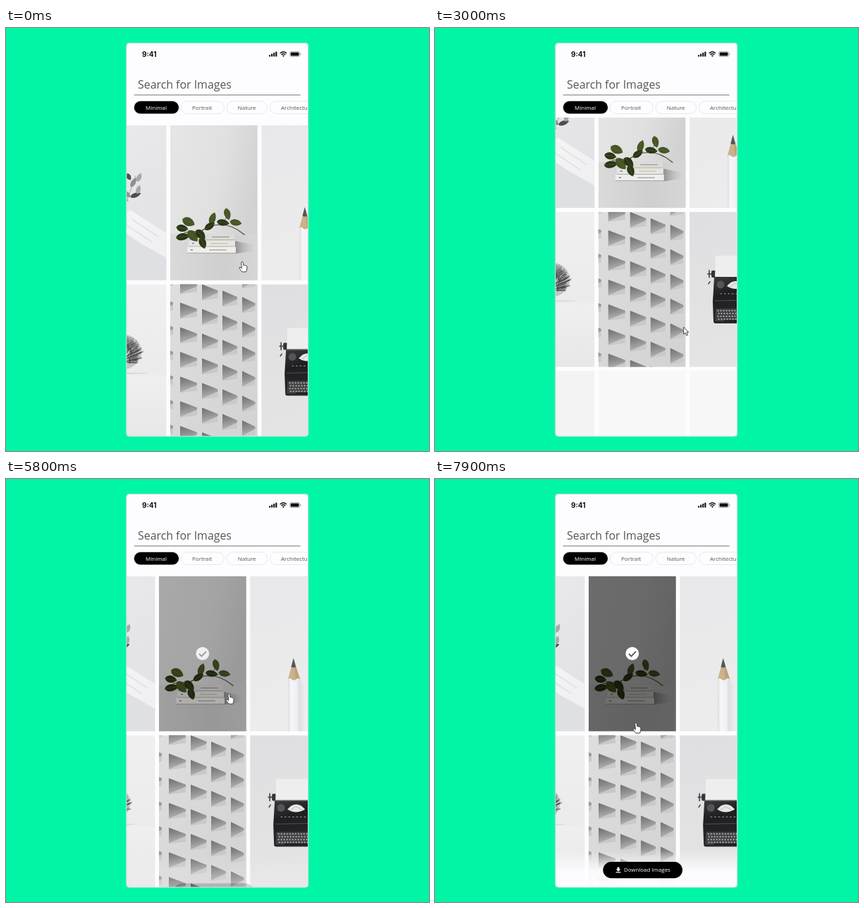
Write an HTML page that moves like this. It is 600 px wide and 600 px high and loops after 8 s.

```html
<!DOCTYPE html>
<html lang="en">
<head>
<meta charset="utf-8">
<title>Image search</title>
<style>
  html, body { margin: 0; width: 100%; height: 100%; overflow: hidden; background: #00f6a6; }
  svg { display: block; }
  #stage { width: 100vw; height: 100vh; }
  text { font-family: "Open Sans", "Noto Sans", sans-serif; }
  .clock { font: 700 10px Inter, sans-serif; }
</style>
</head>
<body>
<svg id="stage" viewBox="0 0 600 600">
  <defs>
    <linearGradient id="wall" x2="1" y2=".35"><stop stop-color="#e6e6e7"/><stop offset=".6" stop-color="#e0e0e1"/><stop offset="1" stop-color="#d2d2d3"/></linearGradient>
    <linearGradient id="desk" x2="1"><stop stop-color="#dadada"/><stop offset=".6" stop-color="#cfcfd0"/><stop offset="1" stop-color="#d6d6d7"/></linearGradient>
    <linearGradient id="shade" x2="1"><stop stop-color="#909091"/><stop offset="1" stop-color="#c8c8c9" stop-opacity="0"/></linearGradient>
    <linearGradient id="pale" x2=".3" y2="1"><stop stop-color="#e8e8ea"/><stop offset="1" stop-color="#ececed"/></linearGradient>
    <linearGradient id="room" x2=".4" y2="1"><stop stop-color="#ebebec"/><stop offset=".6" stop-color="#e5e5e8"/><stop offset="1" stop-color="#e1e2e5"/></linearGradient>
    <linearGradient id="beam" x2="1" y2=".6"><stop stop-color="#f6f6f7"/><stop offset="1" stop-color="#f0f0f2"/></linearGradient>
    <linearGradient id="paper" x2=".2" y2="1"><stop stop-color="#dfdfe1"/><stop offset="1" stop-color="#e4e4e5"/></linearGradient>
    <linearGradient id="snow" x2="0" y2="1"><stop stop-color="#f0f0f1"/><stop offset=".57" stop-color="#ebebec"/><stop offset=".6" stop-color="#efeff0"/><stop offset="1" stop-color="#e7e7e8"/></linearGradient>
    <linearGradient id="pane" x2=".25" y2="1"><stop stop-color="#6f6f70"/><stop offset=".5" stop-color="#8d8d8e"/><stop offset="1" stop-color="#b4b4b5"/></linearGradient>
    <linearGradient id="facade" x2="1" y2="1"><stop stop-color="#dededf"/><stop offset="1" stop-color="#d2d2d3"/></linearGradient>
    <linearGradient id="barrel" x2="1"><stop stop-color="#dedee1"/><stop offset=".25" stop-color="#f6f6f9"/><stop offset=".7" stop-color="#f0f0f4"/><stop offset="1" stop-color="#dadade"/></linearGradient>
    <linearGradient id="metal" x2=".3" y2="1"><stop stop-color="#3a3a3c"/><stop offset=".4" stop-color="#1f1f21"/><stop offset="1" stop-color="#29292b"/></linearGradient>
    <linearGradient id="fade" x2="0" y2="1"><stop stop-color="#fdfcfe" stop-opacity="0"/><stop offset=".55" stop-color="#fdfcfe" stop-opacity=".9"/><stop offset="1" stop-color="#fdfcfe"/></linearGradient>
    <clipPath id="screen"><rect x="171" y="21.5" width="257.5" height="557.5" rx="4"/></clipPath>
    <clipPath id="feed"><rect x="171" y="127" width="257.5" height="452"/></clipPath>
  </defs>
  <rect width="600" height="600" fill="#00f6a6"/>
  <rect x="170.7" y="21.2" width="258.1" height="558.1" rx="4" fill="#fdfcfe"/>
  <g clip-path="url(#screen)">
    <g clip-path="url(#feed)"><g id="grid"></g></g>
    <g id="header"></g>
    <g id="action">
      <rect x="171" y="527" width="258" height="53" fill="url(#fade)"/>
      <g id="button">
        <rect x="238.3" y="543" width="112.7" height="23.2" rx="11.6"/>
        <path d="M258.6 550.6h2.8v3h2l-3.4 3.2-3.4-3.2h2zM256.6 557.3h6.8v1.2h-6.8z" fill="#fff"/>
        <text x="268" y="557.4" font-size="7.9" fill="#fff">Download Images</text>
      </g>
    </g>
  </g>
  <rect x="170.9" y="21.4" width="257.7" height="557.7" rx="4" fill="none" stroke="#c9dcd5" stroke-width="1"/>
  <g id="cursor">
    <path id="arrow" d="M0 0V10.3L2.4 8.2 4.1 12 5.9 11.2 4.2 7.5H7.2Z" fill="#fff" stroke="#333" stroke-width=".9"/>
    <path id="hand" d="M-1.3 1.2Q-1-.4.3 0 1.3.3 1.4 1.6L1.8 5Q3.2 4 3.7 5.4 5 4.7 5.4 6 6.9 5.6 7 7L6.7 10.6 5.6 14.4H-.1L-3.6 10Q-4.8 7.9-2.9 7.8L-.6 9.4Z" fill="#fff" stroke="#333" stroke-width=".9" stroke-linejoin="round"/>
  </g>
</svg>
<script>
const $ = id => document.getElementById(id);
const LOOP = 8000, STEP = 100;
const CELL = { w: 123.7, h: 219.8, dx: 129.2, dy: 225.4 };

const rect = (x, y, w, h, fill, extra = '') =>
  `<rect x="${x}" y="${y}" width="${w}" height="${h}" fill="${fill}" ${extra}/>`;
const path = (d, fill, extra = '') => `<path d="${d}" fill="${fill}" ${extra}/>`;
const line = (d, color, width, extra = '') =>
  path(d, 'none', `stroke="${color}" stroke-width="${width}" stroke-linecap="round" ${extra}`);
const text = (x, y, size, fill, s, extra = '') =>
  `<text x="${x}" y="${y}" font-size="${size}" fill="${fill}" ${extra}>${s}</text>`;
const range = (n, fn) => Array.from({ length: n }, (_, i) => fn(i)).join('');
const backdrop = fill => rect(0, 0, 124, 220, fill);

function seeded(seed) {
  return () => (seed = (seed * 16807) % 2147483647) / 2147483647;
}

// A pointed leaf centred on x, y
function leaf([x, y, angle, len, wide, fill], vein) {
  const l = len / 2, k = wide * .67;
  const d = `M${-l} 0C${-l * .7} ${-k} ${l * .4} ${-k} ${l} 0C${l * .4} ${k} ${-l * .7} ${k} ${-l} 0Z`;
  return `<g transform="translate(${x} ${y}) rotate(${angle})">${path(d, fill)}` +
    (vein ? line(`M${-l} 0H${l * .8}`, vein, .4) : '') + '</g>';
}

function books() {
  const dark = '#2b3616', mid = '#455524';
  const leaves = [
    [26, 137, 25, 19, 12, mid], [17, 146, 10, 17, 10, dark], [18, 158, -10, 20, 10, dark],
    [32, 157, 50, 20, 12, mid], [43, 155, 45, 18, 11, dark], [46, 167, 70, 17, 10, dark],
    [60, 132, -70, 18, 9, mid], [56, 143, -35, 17, 9, dark], [81, 126, 75, 17, 9, mid],
    [75, 138, 10, 18, 9, dark], [93, 138, 10, 17, 9, mid]
  ];
  const book = i => {
    const x = 28 - i * 2, y = 154 + i * 9.2, w = 63 + i * 3;
    return rect(x, y, w, 8.6, ['#dcdbd8', '#e6e5e2', '#efeeec'][i]) +
      rect(x, y + 8.4, w, .8, '#9a9894') + rect(x + 5, y + 3.6, 3, 1.4, '#777') +
      line(`M${x + 32} ${y + 4.4}h24`, i === 1 ? '#c3ac72' : '#77736b', .9, 'stroke-dasharray="1.6 1.1"');
  };
  return backdrop('url(#wall)') + rect(0, 154, 124, 66, 'url(#desk)') +
    path('M92 164L120 170 122 178 92 182Z', 'url(#shade)') +
    range(3, book) +
    line('M105 155Q88 141 72 141T44 150L20 152', '#4b4228', 1.2) +
    line('M76 139L81 126M56 148L60 133', '#4b4228', .8) +
    leaves.map(l => leaf(l, '#69793c')).join('');
}

function olive() {
  const leaves = [
    [70, 73, 55, 11], [77, 81, -60, 15], [85, 74, -65, 13], [80, 99, -20, 16], [68, 98, 40, 12],
    [64, 105, 20, 13], [57, 115, -50, 15], [37, 113, 65, 14], [52, 125, 15, 16],
    [43, 144, -40, 13], [36, 142, 70, 13], [84, 91, -75, 13], [63, 121, -70, 14]
  ];
  return backdrop('url(#room)') +
    path('M0 152L60 148 124 190V220H0Z', '#dddfe3', 'opacity=".55"') +
    path('M44 138L72 120 124 153V188L88 168Z', 'url(#beam)') +
    path('M38 122Q50 114 66 122L82 134Q60 136 38 130Z', '#f2f2f3') +
    line('M76 134L112 158M68 142L104 166', '#e2e2e5', 2) +
    line('M42 147Q52 130 61 117T80 72M50 130Q40 122 36 108', '#8b8782', .7) +
    leaves.map(([x, y, a, l], i) => leaf([x, y, a, l, 6.5, ['#4d4d50', '#8e8e91', '#a8a8ab'][i % 3]])).join('');
}

function pencil() {
  return backdrop('url(#pale)') + rect(71, 150, 4, 70, '#dddde0', 'opacity=".5"') +
    rect(53.8, 144, 17.2, 76, 'url(#barrel)') +
    path('M61.6 117L53.8 146Q56.5 143 59 146 62 149 65.5 146 68.5 143 71 146Z', '#cbb28a') +
    path('M61.6 117L64.5 146Q68.5 143 71 146Z', '#b59a70', 'opacity=".6"') +
    path('M61.6 116L58.3 128.5Q61.6 130.5 65 128.5Z', '#55565a');
}

function tree() {
  const rnd = seeded(77), cx = 60.5, base = 113;
  const limbs = range(58, i => {
    const angle = Math.PI * (-1.22 + 1.44 * (i + rnd()) / 58), reach = .7 + rnd() * .32;
    const x = cx + Math.cos(angle) * 30 * reach, y = 97 + Math.sin(angle) * 28 * reach;
    const mx = cx + (x - cx) * .5, my = base + (y - base) * .65;
    const twig = (x - cx) * .25, tip = 3 + rnd() * 4;
    return `M${cx} ${base - rnd() * 8}Q${mx} ${my} ${x} ${y}M${mx} ${my}l${twig + tip} ${-tip}` +
      `M${mx} ${my}l${twig - tip} ${-tip}M${(mx + x) / 2} ${(my + y) / 2}l${twig} ${-tip * .5}`;
  });
  return backdrop('url(#snow)') +
    '<ellipse cx="60.5" cy="96" rx="28" ry="25" fill="#666" opacity=".3"/>' +
    '<ellipse cx="60" cy="126.5" rx="38" ry="1" fill="#d6d6d7"/>' +
    line(limbs, '#3c3c3e', .55) + line(`M${cx} 125V${base - 8}`, '#333', 2.2);
}

function building() {
  const lefts = [-18, 14, 45, 74, 102], widths = [22, 24, 22.5, 21, 18.5];
  const panes = c => range(8, r => {
    const x = lefts[c], w = widths[c], y = -53 + r * 35 + c * 9;
    return path(`M${x} ${y}L${x + w} ${y + 9}V${y + 20}L${x} ${y + 23}Z`, '#c9c9ca') +
      path(`M${x} ${y}L${x + w} ${y + 9}V${y + 12}L${x} ${y + 22}Z`, 'url(#pane)');
  });
  return backdrop('url(#facade)') + range(5, panes);
}

function typewriter() {
  const keys = range(4, r => range(13, c =>
    `<circle cx="${40.5 + c * 4 + (r % 2)}" cy="${140 + r * 4}" r="1.2" fill="#a2a2a3"/>`));
  return backdrop('url(#paper)') +
    path('M93 95L103 130 97 159 85 156Z', '#b6b6b8', 'opacity=".4"') +
    rect(31, 83, 61, 10, '#343436', 'rx="2"') +
    line('M28 83v10M90 81v12M29 99l-2 3M31 88h-5', '#444446', 1.6) +
    path('M37 62H86L87 92H36Z', '#eeeeef') +
    path('M35 93H92L94 127 96 156Q96 158 93 158H37Q34 158 34 155L33 127Z', 'url(#metal)') +
    '<circle cx="44" cy="103" r="5.5" fill="#555557"/><circle cx="87" cy="103" r="5.5" fill="#555557"/>' +
    path('M53 105Q59 98 65.5 98T78 105Q65 113 53 105Z', '#e6e6e6') +
    line('M58 106L65 101 73 106', '#999', .6) +
    line('M44 116H82', '#8b8b8b', 1.3, 'stroke-dasharray="1.5 4"') +
    line('M36 126L92 125', '#505052', 1) +
    path('M37 137H92L94 155H36Z', '#3f3f41') + keys +
    rect(49, 153.5, 32, 2, '#1f1f20');
}

function hill() {
  return backdrop('#f8f8f9') + path('M0 121Q60 115 124 123V220H0Z', '#38383b') +
    range(16, i => line(`M${-30 + i * 11} ${125 + (i % 3) * 4}q14 38 44 95`, '#48484b', .9, 'opacity=".55"'));
}

function birds() {
  const flock = [[4, 116], [34, 105], [60, 99], [88, 92], [108, 84]];
  return backdrop('#f7f7f8') + flock.map(([x, y], i) =>
    path(`M${x - 3.5} ${y}L${x - .8} ${y - 1}L${x - .5 + i * .3} ${y - 4.5}L${x + 1} ${y - .7}L${x + 3.5} ${y - .4}L${x + 1} ${y + .9}L${x - .3} ${y + 4}L${x - 1} ${y + 1}Z`, '#333')).join('');
}

const photos = [
  [olive, books, pencil],
  [tree, building, typewriter],
  [() => backdrop('#f3f3f4'), hill, birds]
];
const selection = '<g id="selection">' + rect(0, 0, 124, 220, '#000', 'opacity=".53"') +
  '<circle cx="61.8" cy="109.7" r="9.4" fill="#fff"/>' +
  path('M57 110L60.4 113.4 67 106.6', 'none', 'stroke="#555" stroke-width="1.8"') + '</g>';

// The grid's zero point is the top left corner of the middle column
$('grid').innerHTML = photos.map((row, r) => row.map((photo, c) =>
  `<svg x="${(c - 1) * CELL.dx}" y="${r * CELL.dy}" width="${CELL.w}" height="${CELL.h}">` +
  photo() + (photo === books ? selection : '') + '</svg>').join('')).join('');

const chip = (x, w, tx, label, on) =>
  rect(x, 103.8, w, 17.8, on ? '#000' : '#fdfcfe', `rx="8.9" stroke="${on ? 'none' : '#e3e2e5'}" stroke-width=".8"`) +
  text(tx, 115.5, 8, on ? '#fff' : '#555', label);

$('header').innerHTML =
  rect(171, 21, 258, 106, '#fdfcfe') +
  text(193, 40.5, 10, '#111', '9:41', 'class="clock"') +
  range(4, i => rect(373 + i * 3.1, 38.2 - i * 1.6, 2.1, 2.4 + i * 1.6, '#111', 'rx=".5"')) +
  line('M389.2 35.6Q393.4 31.8 397.6 35.6M390.9 37.6Q393.4 35.4 395.9 37.6', '#111', 1.4) +
  path('M391.8 39Q393.4 37.8 395 39L393.4 40.9Z', '#111') +
  rect(402.5, 33.4, 14.2, 7.2, 'none', 'rx="2" stroke="#999" stroke-width=".7"') +
  rect(403.7, 34.6, 11.8, 4.8, '#111', 'rx="1"') + rect(417.4, 35.8, 1, 2.4, '#999', 'rx=".5"') +
  text(187, 85.8, 15.9, '#555', 'Search for Images') +
  rect(181.7, 94.5, 236, 1, '#777') +
  chip(181.7, 63.4, 198, 'Minimal', true) + chip(248.2, 61.2, 264, 'Portrait') +
  chip(313, 57.6, 328.8, 'Nature') + chip(374.5, 80, 390, 'Architecture');

// Each key: time, x, y
const scroll = [
  [0, 233, 138], [300, 233, 138], [1000, 165, 99], [2500, 168.8, -67], [3500, 294.8, 138],
  [4500, 206.7, 132.5], [5400, 217, 138], [6000, 217, 138], [6600, 239.7, 138], [7900, 218, 138]
];
const pointer = [
  [0, 335, 331.5], [300, 310, 405], [1000, 241.7, 366.3], [2500, 293.6, 312.7], [3500, 411.7, 535.7],
  [4500, 323, 538], [5400, 316, 304], [5700, 316, 304], [6600, 322, 324], [7900, 285, 346]
];

const clamp = v => Math.min(1, Math.max(0, v));
const smooth = v => v * v * (3 - 2 * v);

function at(keys, t) {
  const i = keys.findIndex(k => k[0] > t);
  if (i < 0) return keys[keys.length - 1].slice(1);
  const [t0, x0, y0] = keys[i - 1], [t1, x1, y1] = keys[i];
  const p = smooth((t - t0) / (t1 - t0));
  return [x0 + (x1 - x0) * p, y0 + (y1 - y0) * p];
}

const move = (id, [x, y]) => $(id).setAttribute('transform', `translate(${x} ${y})`);
const show = (id, amount) => $(id).setAttribute('opacity', amount);

function draw(t) {
  move('grid', at(scroll, t));
  move('cursor', at(pointer, t));
  const pointing = t < 300 || t >= 5000;
  show('hand', pointing ? 1 : 0);
  show('arrow', pointing ? 0 : 1);
  show('selection', clamp((t - 5700) / 200));
  const rise = smooth(clamp((t - 5700) / 400));
  show('action', rise);
  move('button', [0, 36 * (1 - rise)]);
}

const start = performance.now();
function tick(now) {
  const t = Math.max(0, now - start) % LOOP;
  draw(Math.floor(t / STEP) * STEP);
  requestAnimationFrame(tick);
}
draw(0);
requestAnimationFrame(tick);
</script>
</body>
</html>
```
